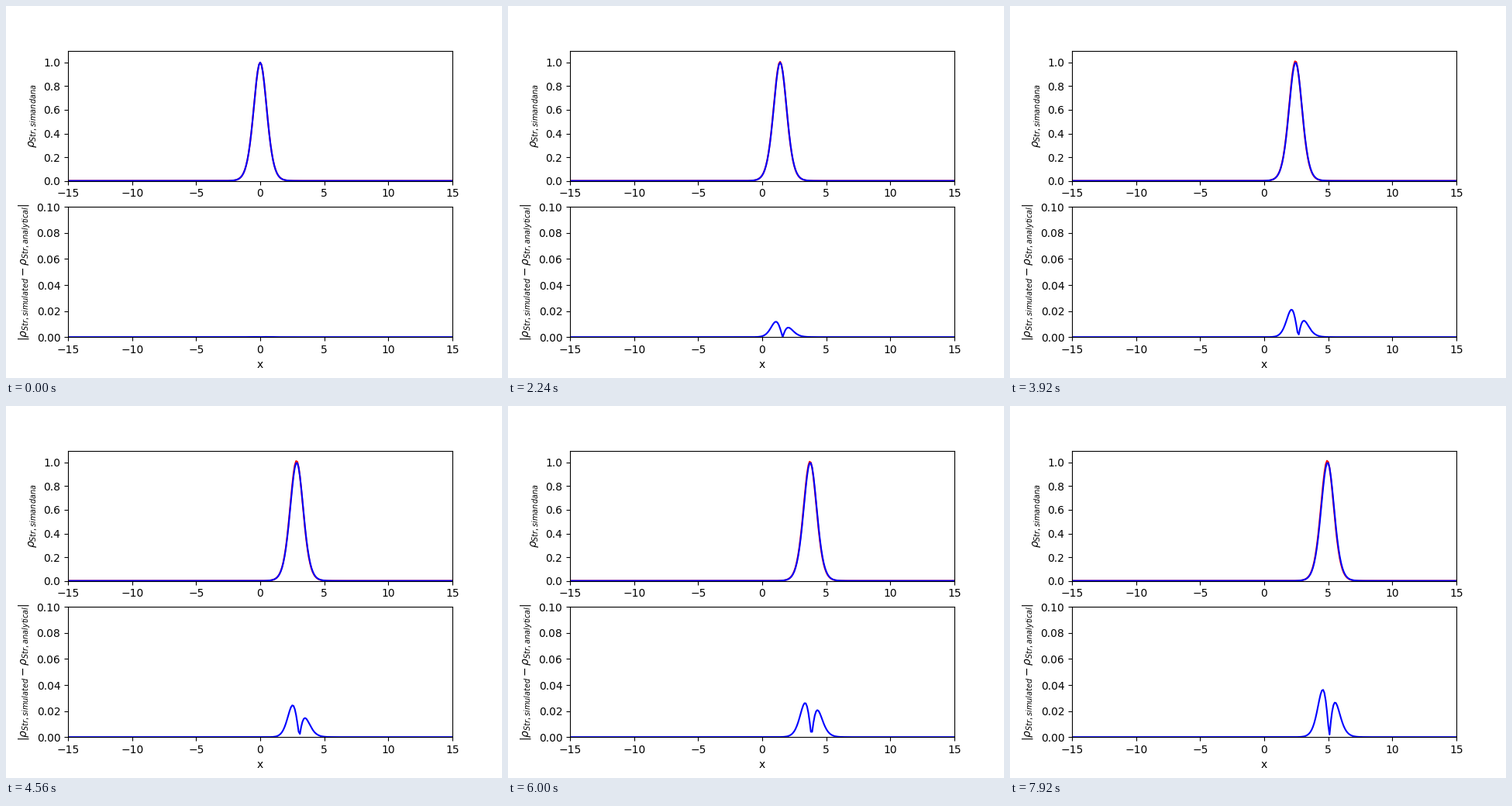
These frames come from a looping animation (640x480 px, 8 s). A matplotlib script:

```python
import numpy as np
import matplotlib.pyplot as plt
from matplotlib.animation import FuncAnimation

FRAMES = 100
INTERVAL = 80
STEP = 0.05            # distance travelled per frame
BREATH = 36            # frames per breathing cycle of the simulated peak

x = np.linspace(-15, 15, 301)


def densities(n):
    """Exact soliton, and a simulated one that lags behind and breathes."""
    u = x - STEP * n
    t = np.tanh(u)
    exact_rho = 1 / np.cosh(u) ** 4
    lag = 0.0006 + 0.00106 * n
    excess = 0.0045 * (1 - np.cos(2 * np.pi * n / BREATH)) + 0.0001 * n
    simulated_rho = exact_rho * (1 + excess * (1 - 2.2 * u * t) - lag * t)
    return simulated_rho, exact_rho


plt.rcParams["font.family"] = "DejaVu Sans"
fig, (top, bottom) = plt.subplots(2, 1, figsize=(6.4, 4.8), dpi=100)

top.set(xlim=(-15, 15), ylim=(0, 1.1))
top.set_ylabel(r"$\rho_{Str,sim and ana}$")
simulated, = top.plot([], [], color="red")
exact, = top.plot([], [], color="blue")

bottom.set(xlim=(-15, 15), ylim=(0, 0.1), xlabel="x")
bottom.set_ylabel(r"$|\rho_{Str,simulated}-\rho_{Str,analytical}|$")
error, = bottom.plot([], [], color="blue")


def update(n):
    simulated_rho, exact_rho = densities(n)
    simulated.set_data(x, simulated_rho)
    exact.set_data(x, exact_rho)
    error.set_data(x, np.abs(simulated_rho - exact_rho))
    return simulated, exact, error


anim = FuncAnimation(fig, update, frames=FRAMES, interval=INTERVAL,
                     repeat=True, repeat_delay=0)
plt.show()
```
